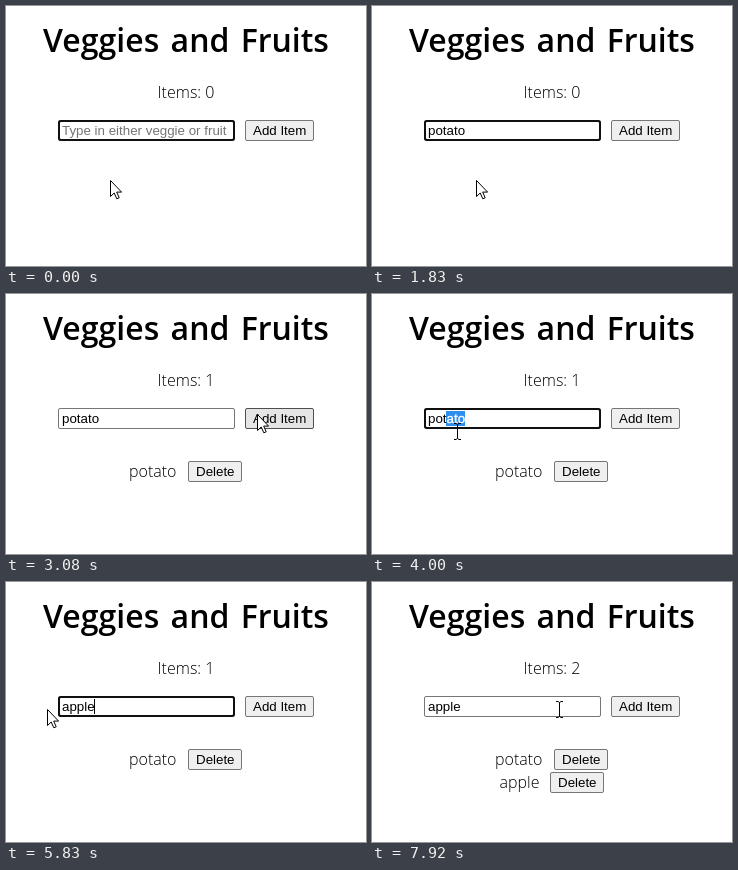
An HTML page that plays this animation: 360 by 260 pixels, repeating every 8000 ms.

```html
<!DOCTYPE html>
<html lang="en">
<head>
<meta charset="utf-8">
<title>Veggies and Fruits</title>
<style>
  html, body { margin: 0; width: 100%; height: 100%; overflow: hidden; background: #fff; }
  svg { display: block; width: 360px; height: 260px; }
  text { font: 300 16px "Open Sans", "Noto Sans", sans-serif; white-space: pre; }
  .title { font-size: 32px; font-weight: 600; word-spacing: 3px; }
  .ui { font: 13.333px "Liberation Sans", Arial, sans-serif; }
  .button rect { fill: #efefef; stroke: #767676; }
  .button.hover rect { fill: #e5e5e5; stroke: #4f4f4f; }
  .button.active rect { fill: #f5f5f5; stroke: #8d8d8d; }
  #field { fill: #fff; stroke: #767676; }
  #ring { fill: none; stroke: #101010; stroke-width: 2; }
  #placeholder { fill: #757575; }
  #selection { fill: #2f8fef; }
  #picked { fill: #fff; stroke: #fff; stroke-width: .4; }
  #arrow { fill: #fff; stroke: #000; stroke-linejoin: miter; }
  #beam { fill: none; stroke: #000; }
</style>
</head>
<body>
<svg viewBox="0 0 360 260">
  <text class="title" x="180" y="46" text-anchor="middle">Veggies and Fruits</text>
  <text id="count" x="180" y="92" text-anchor="middle">Items: 0</text>

  <rect id="field" x="52.5" y="114.5" width="176" height="20" rx="1.5"/>
  <rect id="ring" x="53" y="115" width="175" height="19" rx="2"/>
  <rect id="selection" y="117" height="15"/>
  <text id="placeholder" class="ui" x="56" y="129">Type in either veggie or fruit</text>
  <text id="value" class="ui" x="56" y="129"><tspan id="plain"></tspan><tspan id="picked"></tspan></text>
  <rect id="caret" y="117" width="1" height="15"/>

  <g id="add" class="button">
    <rect x="239.5" y="114.5" width="68" height="20" rx="1.5"/>
    <text class="ui" x="247" y="129">Add Item</text>
  </g>

  <g id="row1">
    <text x="123" y="182.5">potato</text>
    <g class="button">
      <rect x="182.5" y="167.5" width="53" height="20" rx="1.5"/>
      <text class="ui" x="190" y="182">Delete</text>
    </g>
  </g>
  <g id="row2">
    <text x="127.5" y="205.5">apple</text>
    <g class="button">
      <rect x="178.5" y="190.5" width="53" height="20" rx="1.5"/>
      <text class="ui" x="186" y="205">Delete</text>
    </g>
  </g>

  <path id="arrow" d="M.5 .5V16.5L4.2 13L6.8 18.8L9.2 17.8L6.7 12.1H11.6Z"/>
  <path id="beam" d="M-3 -8.5H-1L.5 -7.5L2 -8.5H4M.5 -7.5V6.5M-3 7.5H-1L.5 6.5L2 7.5H4"/>
</svg>
<script>
const $ = id => document.getElementById(id);
const FPS = 12, LOOP = 8000;

// Each track is a list of [tick, ...state], ordered by tick.
const typing = [
  [0, ''], [5, 'p'], [6, 'po'], [12, 'pot'], [13, 'pota'], [14, 'potat'], [16, 'potato'],
  [63, 'a'], [65, 'ap'], [67, 'app'], [68, 'appl'], [70, 'apple']
];
const focus = [[0, true], [35, false], [46, true], [89, false]];
const caretOn = [[0, false], [5, true], [22, false], [28, true], [47, false], [63, true], [76, false], [82, true]];
const selectFrom = [[0, 9], [47, 5], [48, 3], [49, 1], [50, 0], [63, 9]];
const pressed = [[0, false], [35, true], [37, false], [89, true], [91, false]];
const dragging = [[0, false], [46, true], [50, false]];
const items = [[0, 0], [37, 1], [91, 2]];
const pointer = [
  [0, 104, 174], [24, 104, 174], [33, 251, 120], [40, 251, 120], [46, 102, 129],
  [48, 85, 138], [50, 41, 127], [77, 41, 127], [83, 250, 130], [91, 250, 130],
  [93, 246, 130], [95, 187, 128], [96, 187, 128]
];

const at = (track, tick) => track.findLast(key => key[0] <= tick)[1];
const show = (el, on) => el.setAttribute('visibility', on ? 'visible' : 'hidden');
const inside = ([x, y], left, right) => x >= left && x < right && y >= 114 && y < 135;

function pointerAt(tick) {
  const i = pointer.findLastIndex(key => key[0] <= tick);
  const [t0, x0, y0] = pointer[i];
  const [t1, x1, y1] = pointer[i + 1];
  const u = (tick - t0) / (t1 - t0), k = u * u * (3 - 2 * u);
  return [Math.round(x0 + (x1 - x0) * k), Math.round(y0 + (y1 - y0) * k)];
}

function drawField(tick) {
  const text = at(typing, tick), start = at(selectFrom, tick);
  const focused = at(focus, tick);
  $('plain').textContent = text.slice(0, start);
  $('picked').textContent = text.slice(start);
  show($('placeholder'), !text);
  show($('ring'), focused);

  const width = text ? $('value').getComputedTextLength() : 0;
  const left = start ? $('plain').getComputedTextLength() : 0;
  const selected = start < text.length;
  show($('selection'), selected);
  $('selection').setAttribute('x', Math.floor(56 + left));
  $('selection').setAttribute('width', selected ? Math.ceil(width - left) : 0);
  show($('caret'), focused && at(caretOn, tick));
  $('caret').setAttribute('x', Math.floor(56 + width));
}

function drawPointer(tick) {
  const pos = pointerAt(tick);
  const beam = at(dragging, tick) || inside(pos, 52, 229);
  for (const id of ['arrow', 'beam']) {
    $(id).setAttribute('transform', `translate(${pos})`);
    show($(id), (id === 'beam') === beam);
  }
  const hover = inside(pos, 239, 308) && !at(dragging, tick);
  $('add').setAttribute('class', 'button' + (at(pressed, tick) ? ' active' : hover ? ' hover' : ''));
}

function draw(tick) {
  const count = at(items, tick);
  $('count').textContent = `Items: ${count}`;
  show($('row1'), count > 0);
  show($('row2'), count > 1);
  drawField(tick);
  drawPointer(tick);
}

let last = -1;
const origin = performance.now();
function loop(now) {
  const time = Math.max(0, now - origin) % LOOP;
  // The small bias lets ticks start on times rounded to 10 ms.
  const tick = Math.min(95, Math.floor(time * FPS / 1000 + 0.05));
  if (tick !== last) draw(last = tick);
  requestAnimationFrame(loop);
}
draw(0);
requestAnimationFrame(loop);
</script>
</body>
</html>
```
